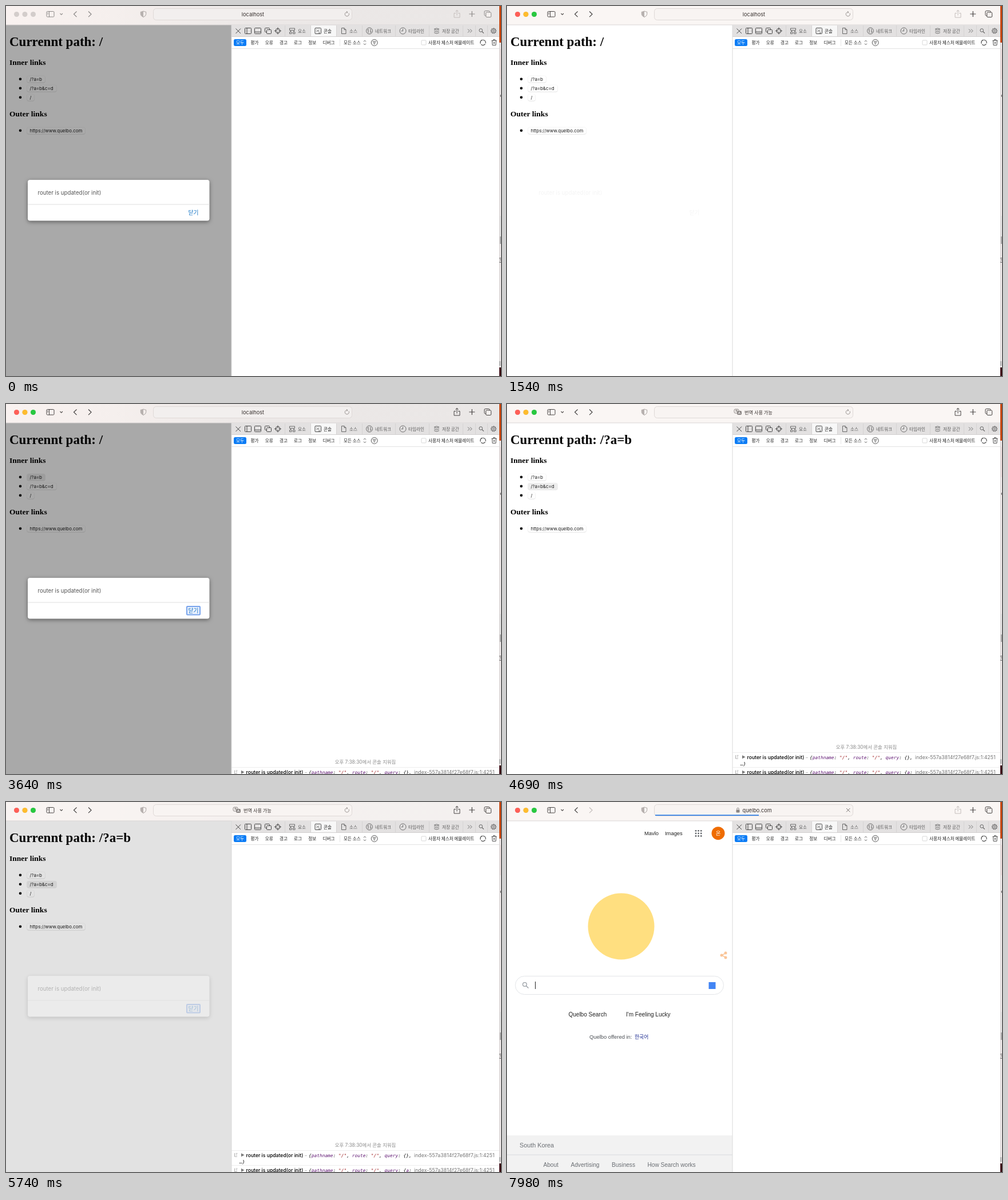
An HTML page with a canvas for the animation above (8 s loop, 865 by 647 pixels).

```html
<!DOCTYPE html>
<html lang="ko">
<head>
<meta charset="utf-8">
<title>Router demo</title>
<style>
html, body { margin: 0; width: 100%; height: 100%; overflow: hidden; background: #fff; }
canvas { display: block; }
</style>
</head>
<body>
<canvas id="stage" width="865" height="647"></canvas>
<script>
const WIDTH = 865, HEIGHT = 647, LOOP = 8000, TICK = 70;
const stage = document.getElementById('stage').getContext('2d');
const scratch = new OffscreenCanvas(WIDTH, HEIGHT).getContext('2d');
let ctx = stage;

const CJK = '"Noto Sans CJK KR", "Noto Sans CJK", sans-serif';
const UI = 'Inter, ' + CJK;
const ARIAL = '"Liberation Sans", ' + CJK;
const SERIF = '"Liberation Serif", serif';
const MONO = '"DejaVu Sans Mono", monospace';

function rect(x, y, w, h, color) {
  ctx.fillStyle = color;
  ctx.fillRect(x, y, w, h);
}

function box(x, y, w, h, r, fill, line, width = 1) {
  ctx.beginPath();
  ctx.roundRect(x, y, w, h, r);
  if (fill) { ctx.fillStyle = fill; ctx.fill(); }
  if (line) { ctx.strokeStyle = line; ctx.lineWidth = width; ctx.stroke(); }
}

function dot(x, y, r, color) {
  ctx.fillStyle = color;
  ctx.beginPath();
  ctx.arc(x, y, r, 0, Math.PI * 2);
  ctx.fill();
}

function ring(x, y, r, color, width = 1) {
  box(x - r, y - r, 2 * r, 2 * r, r, null, color, width);
}

function line(d, color, width = 1) {
  ctx.strokeStyle = color;
  ctx.lineWidth = width;
  ctx.stroke(new Path2D(d));
}

function text(str, x, y, size, color = '#000', family = UI, style = '', align = 'left') {
  ctx.font = `${style} ${size}px ${family}`;
  ctx.textAlign = align;
  ctx.fillStyle = color;
  ctx.fillText(str, x, y);
  return ctx.measureText(str).width;
}

// Blends a whole group at once, so overlapping parts do not show through.
function withAlpha(alpha, draw) {
  if (alpha <= 0) return;
  if (alpha >= 1) return draw();
  scratch.clearRect(0, 0, WIDTH, HEIGHT);
  ctx = scratch;
  draw();
  ctx = stage;
  ctx.globalAlpha = alpha;
  ctx.drawImage(scratch.canvas, 0, 0);
  ctx.globalAlpha = 1;
}

const ramp = (t, from, to) => Math.min(1, Math.max(0, (t - from) / (to - from)));

function stateAt(t) {
  const dialog = 1 - ramp(t, 1330, 1540) + ramp(t, 2450, 2870) - ramp(t, 3640, 3850)
    + ramp(t, 4690, 5040) - ramp(t, 5600, 5810);
  const step = t < 3850 ? 0 : t < 5810 ? 1 : 2;
  const left = t >= 7560;
  return {
    dialog, step, left,
    active: ramp(t, 210, 560),
    ghost: t >= 1540 && t < 1680,
    hover: t >= 7490 ? 3 : t >= 4690 && t < 5810 ? 1 : t >= 2380 && t < 3850 ? 0 : -1,
    rows: t < 1680 || t >= 7630 ? 0 : step + 1,
    canShare: t >= 1680 && !left,
    banner: ramp(t, 3850, 4130) - ramp(t, 5880, 6160),
    badge: left ? 0 : ramp(t, 6020, 6300),
    progress: ramp(t, 7490, 7980),
    portal: t >= 7770,
    picture: ramp(t, 7770, 7910)
  };
}

function translateIcon(x, y, color) {
  box(x - 6, y - 5, 8, 7, 2, null, color, 0.8);
  box(x - 1, y - 2, 8, 7, 2, '#8a8583', null);
  line(`M${x - 4} ${y - 3}h4m-2-1v1m1.5 0l-3 3m0-3l3 3`, color, 0.7);
  line(`M${x + 1} ${y + 3.5}l2-4 2 4m-3.3-1.3h2.6`, '#fff', 0.7);
}

function toolbar(s) {
  rect(0, 0, 865, 33, '#faf6f4');
  withAlpha(s.dialog, () => {
    const tint = ctx.createLinearGradient(0, 0, 865, 0);
    tint.addColorStop(0, '#f9f2f0');
    tint.addColorStop(0.22, '#f5efed');
    tint.addColorStop(0.5, '#ece8e7');
    tint.addColorStop(1, '#eae7e6');
    rect(0, 0, 865, 33, tint);
  });
  ['#fe5f57', '#febc2e', '#28c840'].forEach((color, i) => {
    const x = 18.5 + 14.5 * i;
    dot(x, 14.5, 4.5, '#d3cdcb');
    withAlpha(s.active, () => dot(x, 14.5, 4.5, color));
  });
  const shade = Math.round(140 - 70 * s.active);
  const ink = `rgb(${shade},${shade - 3},${shade - 4})`;
  const pale = '#c4bebc';
  box(71, 9.5, 13, 9.5, 1.5, null, ink);
  line('M75.5 9.5v9.5M72.5 12h1.5M72.5 14h1.5', ink);
  line('M94.5 13l2.2 2.3 2.2-2.3', ink, 1.1);
  line('M123.5 9.5l-5 4.8 5 4.8', ink, 1.2);
  line('M144 9.5l5 4.8-5 4.8', s.left ? pale : ink, 1.2);
  line('M240 9q2.5 1.2 4.7 1.3v4q0 3-4.7 5.2-4.7-2.2-4.7-5.2v-4q2.2-.1 4.7-1.3z', '#aaa4a2');
  ctx.fillStyle = '#b7b1af';
  ctx.fill(new Path2D('M240 9q-2.5 1.2-4.7 1.3v4q0 3 4.7 5.2z'));

  box(257.5, 4.5, 347, 20, 5, s.dialog > 0.5 ? '#f2efee' : '#f8f4f2', '#dfd9d7');
  if (s.left) {
    box(400.5, 13.5, 6, 5, 1, '#8a8583');
    line('M401.8 13.5v-1.5a1.7 1.7 0 0 1 3.4 0v1.5', '#8a8583');
    text('quelbo.com', 411.5, 18, 9.2, '#37302e');
    line('M593 11l6.4 6.4M599.4 11l-6.4 6.4', '#77716f');
    rect(259, 22.3, 181 * s.progress, 1.7, '#2f7fe6');
  } else {
    withAlpha(1 - s.banner, () => text('localhost', 431.5, 18, 9.2, '#37302e', UI, '', 'center'));
    withAlpha(s.banner, () => {
      translateIcon(403, 14, '#77716f');
      text('번역 사용 가능', 415, 17.5, 8.2, '#37302e', CJK);
    });
    withAlpha(s.badge, () => translateIcon(580, 14, '#77716f'));
    line('M599 12.6a3.6 3.6 0 1 1-2.4-1.8M595 9.3l2 1.5-1.6 1.9', '#8f8987', 0.9);
  }

  const share = s.canShare ? ink : pale;
  line('M786 12.5h-3v7.5h10v-7.5h-3M788 16.5v-9.3M785.4 9.8l2.6-2.6 2.6 2.6', share);
  line('M809.3 14h10M814.3 9v10', ink, 1.2);
  box(836, 8.5, 9, 8.5, 1.5, null, ink);
  box(838.7, 11, 9, 8.5, 1.5, '#f4f0ee', ink);
  rect(0, 32.5, 862, 1, '#dad6d5');
}

const BUTTONS = [
  ['/?a=b', 128, 32], ['/?a=b&c=d', 144, 52], ['/', 160, 13], ['https://www.quelbo.com', 218, 102]
];

function demoPage(s) {
  const path = ['/', '/?a=b', '/?a=b&c=d'][s.step];
  text('Currennt path: ' + path, 6, 70, 23, '#000', SERIF, 'bold');
  text('Inner links', 6, 103, 13.5, '#000', SERIF, 'bold');
  text('Outer links', 6, 193, 13.5, '#000', SERIF, 'bold');
  BUTTONS.forEach(([label, y, width], i) => {
    dot(25, y - 0.3, 2.3, '#000');
    box(36.5, y - 5.2, width, 11.8, 3, '#d8d8d8');
    box(36.5, y - 6, width, 11.8, 3, i === s.hover ? '#ededed' : '#fff', '#f1f1f1', 0.6);
    text(label, 41.5, y + 3, 7.9, '#1c1c1c');
  });
}

function dialogText(messageColor, closeColor) {
  text('router is updated(or init)', 55.5, 330, 9.7, messageColor);
  text('닫기', 318.5, 365, 9.8, closeColor, CJK);
}

function dialogLayer(s) {
  withAlpha(s.dialog / 3, () => rect(0, 33, 394, 614, '#000'));
  withAlpha(s.dialog, () => {
    ctx.shadowColor = 'rgba(0,0,0,.45)';
    ctx.shadowBlur = 7;
    ctx.shadowOffsetY = 2;
    box(38, 304, 317.5, 71.5, 4, '#fff');
    ctx.shadowColor = 'transparent';
    rect(38, 346.5, 317.5, 1, '#e0e0e0');
    if (s.active > 0.5) box(316, 354, 23, 14.5, 1, '#e9f0fd', '#77a3ec', 2);
    dialogText('#555', '#1273c4');
  });
  if (s.ghost) dialogText('#f4f4f4', '#f4f4f4');
}

function portalPage(s) {
  text('Mavlo', 240, 58, 9.4, '#222', ARIAL);
  text('Images', 276, 58, 9.4, '#222', ARIAL);
  for (let i = 0; i < 9; i++) {
    dot(330 + 4.6 * (i % 3), 50.3 + 4.6 * Math.floor(i / 3), 1.4, '#5f6368');
  }
  dot(369, 54.7, 11.5, '#ef6c00');
  text('온', 369, 58.3, 9.5, '#fff', CJK, '', 'center');

  withAlpha(s.picture, () => {
    dot(199.5, 217.5, 58, '#ffdf80');
    line('M382 264.5l-7 3.5 7 3.5', '#fac598', 1.5);
    [[382, 264], [375, 268], [382, 272]].forEach(([x, y]) => dot(x, y, 2.5, '#fac598'));
  });

  box(14.5, 304.5, 364, 32, 16, '#fff', '#e3e5e8');
  ring(31, 319, 3.4, '#9aa0a6', 1.3);
  line('M33.5 321.5l4 4', '#9aa0a6', 1.4);
  rect(49, 314, 1, 13, '#222');
  rect(352.5, 315, 12, 12, '#4285f4');
  text('Quelbo Search', 107.5, 374.5, 10, '#222', ARIAL);
  text("I'm Feeling Lucky", 208, 374.5, 10, '#222', ARIAL);
  text('Quelbo offered in:', 144, 413.5, 9.4, '#4d5156', ARIAL);
  text('한국어', 223, 413.5, 8.8, '#1a2a90', CJK);

  rect(0, 583, 394, 64, '#f2f2f2');
  rect(0, 616.5, 394, 1, '#dadce0');
  text('South Korea', 22, 604, 10.8, '#6a6e73', ARIAL);
  [['About', 63.5], ['Advertising', 111.5], ['Business', 183], ['How Search works', 245.5]]
    .forEach(([label, x]) => text(label, x, 638, 10.1, '#6a6e73', ARIAL));
}

function inspectorTabs() {
  const ink = '#5c5c5c';
  rect(394, 33, 468, 21, '#e3e1e1');
  rect(532, 34, 45, 19.5, '#f7f7f7');
  rect(394, 53, 468, 1, '#d2d0d0');
  [487, 532, 577, 622, 680, 739, 798, 820, 841].forEach(x => rect(x, 34, 1, 19, '#d5d3d3'));
  line('M401.5 39.5l8.5 8.5M410 39.5l-8.5 8.5', '#444');
  [417.5, 434.5].forEach(x => box(x, 38.5, 11, 10, 1, null, '#444'));
  line('M421 38.5v10M434.5 45.5h11', '#444');
  box(452.5, 38.5, 8, 7, 1, null, '#444');
  box(455.5, 41.5, 8, 7, 1, '#e3e1e1', '#444');
  ring(475, 43.5, 4, '#444');
  line('M475 37.5v4.5M475 45v4.5M469 43.5h4.5M476.5 43.5h4.5', '#444');

  box(495.5, 39, 9, 3.5, 0, null, ink, 0.9);
  box(495.5, 45.5, 3.5, 3, 0, null, ink, 0.9);
  box(501.5, 45.5, 3.5, 3, 0, null, ink, 0.9);
  line('M497.5 42.5v3M503 42.5v3', ink, 0.9);
  box(540, 38.5, 10.5, 10, 1, null, '#444');
  line('M542.5 41l2 2.3-2 2.5M547.5 41l-2 2.3 2 2.5M546 47h3', '#444', 0.8);
  line('M586.5 38.5h4.5l3 3v7h-7.5zM591 38.5v3h3', ink, 0.9);
  ring(635, 43.5, 5.5, ink, 0.9);
  line('M633 47v-6.5l-1.5 1.8M637 40v6.5l1.5-1.8', ink, 0.9);
  ring(693.5, 43.5, 5.5, ink, 0.9);
  line('M693.5 40v3.7h-3', ink, 0.9);
  line('M748 40.5q4.5-3 9 0q-4.5 3-9 0M748 43.5q4.5 3 9 0M748 46.5q4.5 3 9 0', ink, 0.9);
  [['요소', 510], ['콘솔', 555], ['소스', 600], ['네트워크', 645], ['타임라인', 703], ['저장 공간', 762]]
    .forEach(([label, x]) => text(label, x, 46.5, 7.6, label === '콘솔' ? '#222' : ink, CJK));
  line('M807 40.5l3 3-3 3M811 40.5l3 3-3 3', ink, 0.9);
  ring(829.7, 42.5, 2.8, ink);
  line('M831.8 44.6l3 3', ink, 1.2);
  ring(852, 43.5, 1.5, ink, 0.9);
  ctx.setLineDash([1.7, 1.2]);
  ring(852, 43.5, 4.4, ink, 1.2);
  ctx.setLineDash([]);
  ring(852, 43.5, 3.5, ink, 0.8);
}

function inspectorFilters() {
  box(398, 58, 22, 12, 2.5, '#0a7cf5');
  text('모두', 402, 66.7, 7.6, '#fff', CJK);
  ['평가', '오류', '경고', '로그', '정보', '디버그']
    .forEach((label, i) => text(label, 427.5 + 25.2 * i, 66.5, 7.6, '#222', CJK));
  rect(583, 58, 1, 12, '#e6e6e6');
  text('모든 소스', 590, 66.5, 7.6, '#222', CJK);
  line('M625 62.3l2-2 2 2M625 65.7l2 2 2-2', '#444', 0.9);
  ring(643.7, 64, 5.5, '#444', 0.9);
  line('M640.5 62h6.4M641.5 64.2h4.4M642.5 66.4h2.4', '#444', 0.9);
  box(726, 60, 8, 8, 1, '#fff', '#d8d8d8');
  text('사용자 제스처 에뮬레이트', 738, 66.5, 7.6, '#222', CJK);
  ctx.setLineDash([8.2, 1.4]);
  ring(833.5, 64, 4.6, '#444', 1.2);
  ctx.setLineDash([]);
  line('M848.5 60.5h9M851.5 60v-1.5h3v1.5M849.5 60.5l.5 8h6l.5-8M851.5 62.8l3 3.4M854.5 62.8l-3 3.4', '#444', 0.9);
  rect(394, 74, 468, 1, '#e2e2e2');
}

// Colours keys, strings and punctuation while writing a preview of an object.
function objectPreview(source, x, y) {
  for (const token of source.match(/"[^"]*"|\w+|[^"\w]+/g)) {
    const color = token[0] === '"' ? '#9c1a1c' : /\w/.test(token) ? '#5f1672' : '#111';
    x += text(token, x, y, 7.87, color, MONO, 'italic');
  }
}

const QUERIES = [['{},', '…}'], ['{a:', '"b"}, …}'], ['{a:', '"b", c: "d"}, …}']];

function consoleRows(count) {
  if (!count) return;
  const first = 644 - 26.5 * (count - 1);
  text('오후 7:38:30에서 콘솔 지워짐', 628, first - 15, 8.4, '#8a8a8a', UI, '', 'center');
  for (let i = 0; i < count; i++) {
    const y = first + 26.5 * i;
    rect(394, Math.round(y - 9), 468, 1, '#eeeeee');
    line(`M399.5 ${y - 3.5}v6h4.5M401.5 ${y - 3}h3M401.5 ${y - 0.5}h2.5`, '#999', 0.8);
    ctx.fillStyle = '#777';
    ctx.fill(new Path2D(`M411 ${y - 3.2}l5.5 3-5.5 3z`));
    text('router is updated(or init)', 419.5, y + 3, 8.65, '#000', UI, '500');
    text('–', 522, y + 3, 8, '#999');
    objectPreview('{pathname: "/", route: "/", query: ' + QUERIES[i][0], 529, y + 3);
    objectPreview(QUERIES[i][1], 408, y + 14);
    text('index-557a3814f27e68f7.js:1:4251', 853.5, y + 3, 8.8, '#777', UI, '', 'right');
  }
}

function desktopEdge() {
  rect(862, 0, 3, 647, '#f1ebeb');
  rect(862, 0, 3, 64, '#c6450f');
  rect(862, 64, 1, 583, '#d2cccc');
  rect(863, 75, 2, 53, '#eee0df');
  rect(863, 367, 2, 36, '#e4e4e4');
  rect(863, 403, 2, 13, '#a9a9a9');
  line('M865 155q-2 2 0 4M862 441h3M863 444h2M862 448h3', '#444');
  rect(862, 621, 2, 8, '#aaa');
  rect(862, 632, 3, 15, '#3a0712');
}

function draw(now) {
  const t = Math.floor((now % LOOP) / TICK) * TICK;
  const s = stateAt(t);
  rect(0, 0, WIDTH, HEIGHT, '#fff');
  if (s.portal) portalPage(s);
  else {
    demoPage(s);
    dialogLayer(s);
  }
  toolbar(s);
  rect(394, 33, 468, 614, '#fff');
  inspectorTabs();
  inspectorFilters();
  consoleRows(s.rows);
  rect(393.5, 33, 1, 614, '#d9d9d9');
  desktopEdge();
}

function frame() {
  draw(performance.now());
  requestAnimationFrame(frame);
}
frame();
</script>
</body>
</html>
```
